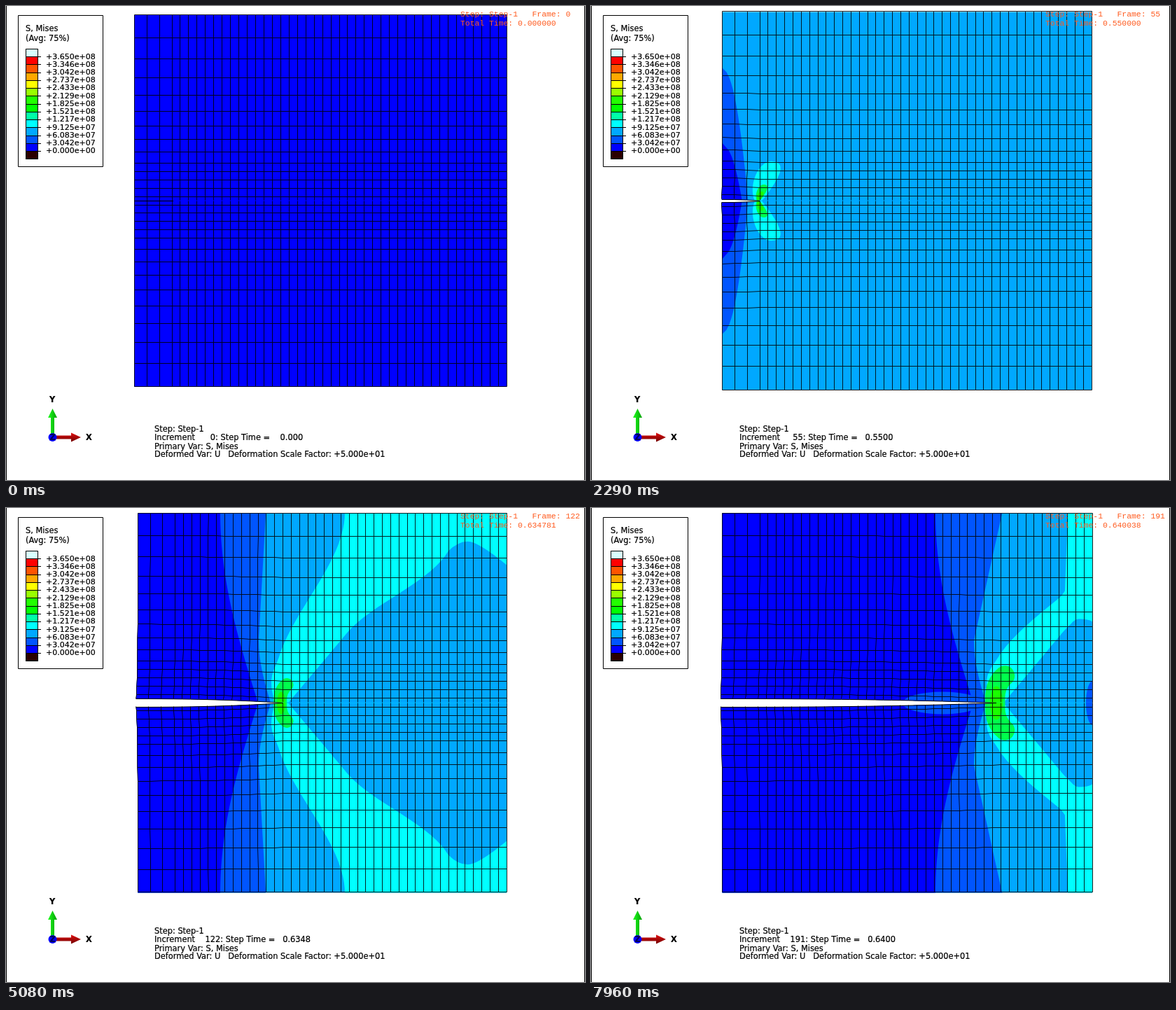
Animation, 827 px wide and 677 px high, one loop 8000 ms. Source, as an HTML page with a canvas:

```html
<!DOCTYPE html>
<html lang="en">
<head>
<meta charset="utf-8">
<title>Crack growth, von Mises stress</title>
<style>
  html, body { margin: 0; width: 100%; height: 100%; overflow: hidden; background: #fff; }
  canvas, svg { position: absolute; left: 0; top: 0; width: 827px; height: 677px; }
  text { white-space: pre; font: 11.4px "DejaVu Sans", sans-serif; stroke: #000; stroke-width: .2px; }
  .label { font-size: 11px; }
  .axis { font-weight: bold; }
  .status { font: 11.4px "Liberation Mono", monospace; fill: #ff5a1e; stroke: none; }
</style>
</head>
<body>
<canvas id="plot" width="827" height="677"></canvas>
<svg viewBox="0 0 827 677">
  <defs>
    <linearGradient id="red" x2="0" y2="1"><stop stop-color="#e01010"/><stop offset="1" stop-color="#700000"/></linearGradient>
    <linearGradient id="green"><stop stop-color="#20ff20"/><stop offset="1" stop-color="#00a000"/></linearGradient>
  </defs>
  <path d="M.5 0V677M826.5 0V677M17.5 13.5H138.5V229.5H17.5Z" fill="none" stroke="#000"/>
  <text x="28" y="36">S, Mises</text>
  <text x="28" y="50">(Avg: 75%)</text>
  <g id="legend"></g>
  <path d="M64 612V588H60L66.5 575L73 588H69V612Z" fill="url(#green)"/>
  <path d="M72 613.5H93V609.5L107 616L93 622.5V618.5H72Z" fill="url(#red)"/>
  <circle cx="66.5" cy="616" r="6" fill="#00f"/>
  <text x="62.5" y="620" class="axis" fill="#000060">Z</text>
  <text x="62" y="566" class="axis">Y</text>
  <text x="114" y="619.5" class="axis">X</text>
  <text x="212" y="607.5">Step: Step-1</text>
  <text x="212" y="620" id="increment"></text>
  <text x="212" y="632.5">Primary Var: S, Mises</text>
  <text x="212" y="644">Deformed Var: U   Deformation Scale Factor: +5.000e+01</text>
  <text x="649" y="15" class="status" id="frameText"></text>
  <text x="649" y="28" class="status" id="timeText"></text>
</svg>
<script>
const LOOP = 8000, FPS = 24, LAST = 191, GROWTH = 63;
const MID = 278, LEFT = 183, RIGHT = 715, HALF = 265.4, TOP = 272, NOTCH = 239;
const ctx = document.getElementById('plot').getContext('2d');
const byId = id => document.getElementById(id);

// Stress bands, lowest first
const BANDS = ['#0000ff', '#0055ff', '#00a8ff', '#00ffff', '#00ff4c', '#1aff00'];

// Crack growth: increment, tip position, total time
const STEPS = [
  [GROWTH, NOTCH, 0.63], [75, 289, 0.631993], [101, 345, 0.633654],
  [122, 393, 0.634781], [149, 469, 0.637125], [LAST, 579, 0.640038]];

// Mesh lines: columns in x, rows as distance from the crack plane
const COLS = [183, 201, 219, ...Array.from({ length: 41 }, (_, i) => 237 + i * 11.95)];
const ROWS = [6];
for (let i = 1; i < 14; i++) ROWS.push(ROWS[i - 1] + (i < 5 ? 11.9 : 16 * 1.094 ** (i - 5)));

const clamp = v => Math.max(0, Math.min(1, v));
const smooth = v => clamp(v) ** 2 * (3 - 2 * clamp(v));
const wave = v => Math.sin(Math.PI * clamp(v));
const range = (end, count) => Array.from({ length: count + 1 }, (_, i) => end * i / count);
const DIST = range(TOP, 34);

function stateAt(n) {
  if (n <= GROWTH) {
    const time = n / 100;
    return { n, time, tip: NOTCH, opening: 3.9 * time, stretch: 8.4 * time, shrink: 8.3 * time, drift: 0 };
  }
  const i = STEPS.findIndex(step => step[0] >= n);
  const a = STEPS[i - 1], b = STEPS[i], f = (n - a[0]) / (b[0] - a[0]);
  const late = clamp((n - 122) / 69);
  return {
    n, tip: a[1] + (b[1] - a[1]) * f, time: a[2] + (b[2] - a[2]) * f,
    opening: 6 - 3.5 * Math.exp((GROWTH - n) / 14),
    stretch: 5.5, shrink: 5.2 - 1.8 * late, drift: clamp(late * 2.6)
  };
}

function fillPath(color, points) {
  ctx.fillStyle = color;
  ctx.beginPath();
  points.forEach(p => ctx.lineTo(...p));
  ctx.fill();
}

function fillSide(color, contour, edge) {
  fillPath(color, [...DIST.map(d => [contour(d), d]), [edge, TOP], [edge, 0]]);
}

function fillEllipse(color, x, rx, ry) {
  ctx.fillStyle = color;
  ctx.beginPath();
  ctx.ellipse(x, 0, rx, ry, 0, 0, 7);
  ctx.fill();
}

function fillBase(color) {
  ctx.fillStyle = color;
  ctx.fillRect(150, -2, 600, 290);
}

// Leaf-shaped zone leaning forward from the tip
function fillLobe(color, scale) {
  ctx.save();
  ctx.translate(NOTCH, 0);
  ctx.scale(scale, scale);
  ctx.fillStyle = color;
  ctx.beginPath();
  ctx.moveTo(-6, 0);
  ctx.bezierCurveTo(-18, 28, 2, 70, 24, 67);
  ctx.bezierCurveTo(50, 65, 36, 38, 6, 0);
  ctx.fill();
  ctx.restore();
}

// Unloaded zone beside the notch; ratio = far stress / level
function shadow(ratio) {
  const height = 115 * Math.sqrt(0.78 / Math.max(ratio - 1, 0.01));
  const width = 33 * (height / 115) ** 0.3;
  return d => {
    const q = d / height;
    return 186 + width * (q < 1 ? (1 - q) ** 0.45 : 1 - q);
  };
}

function paintLoading(time) {
  const ratios = BANDS.map((_, k) => k ? time * 4.685 / k : 9);
  const base = ratios.filter(r => r >= 1).length - 1;
  fillBase(BANDS[base]);
  for (let k = base + 1; k < BANDS.length; k++) {
    const r = ratios[k];
    fillLobe(BANDS[k], Math.min(5, 0.6 * r * r / (1 - r) ** 0.33));
  }
  for (let k = base; k > 0; k--) fillSide(BANDS[k - 1], shadow(ratios[k]), 100);
}

// Contours travel with the tip and change as it nears the right edge
function paintGrowth(tip) {
  const early = Math.max(0, (345 - tip) / 56);
  const late = clamp((tip - 393) / 186);
  const cubic = d => (d / TOP) ** 3;

  const low = d => tip - 33 - 54 * wave(d / TOP / 2) - 53 * clamp(early) * cubic(d);
  const medium = d => tip - 15 - 17 * wave(Math.min(d, 90) / 180)
    + (10 + 30 * late) * Math.max(0, d - 90) / 180 - 60 * Math.max(0, early - 1) * cubic(d);
  const high = d => Math.min(671 + d / 27,
    tip - 9 - 5 * wave(d / 60) + (100 + 100 * late) * smooth((d - 30) / 242));
  const front = d => tip + 10 + 0.84 * d + 48 * wave((d - 100) / 210) ** 2;

  const peak = 90 + 210 * Math.exp((345 - tip) / 120);
  const peakX = 650 + (tip - 345) / 5;
  const drop = 60 * Math.exp((345 - tip) / 90);

  fillBase(BANDS[2]);
  fillSide(BANDS[3], high, 900);

  // Calmer zone ahead of the tip, with a rounded crest
  const rise = range(0.94 * peak, 30).map(d => [front(d), d]);
  const crest = rise[30];
  ctx.fillStyle = BANDS[2];
  ctx.beginPath();
  rise.forEach(p => ctx.lineTo(...p));
  ctx.quadraticCurveTo((crest[0] + peakX) / 2, peak, peakX, peak);
  ctx.quadraticCurveTo(peakX + 15, peak, 717, peak - drop);
  ctx.lineTo(717, 0);
  ctx.fill();

  fillSide(BANDS[1], medium, 100);
  fillSide(BANDS[0], low, 100);

  const wake = clamp((tip - 430) / 149);
  const reach = 20 + 37 * wake;
  fillEllipse(BANDS[1], tip - 20 - reach, reach, 16 * Math.sqrt(wake));
  const edge = clamp((tip - 541) / 38);
  fillEllipse(BANDS[1], 717, 10 * edge, 32 * edge);

  // Plastic zone: a thick curved stroke with a hotter core
  const size = 1 + late / 2;
  ctx.save();
  ctx.translate(tip, 0);
  ctx.scale(size, size);
  ctx.strokeStyle = BANDS[4];
  ctx.lineWidth = 19;
  ctx.lineCap = 'round';
  ctx.beginPath();
  ctx.moveTo(-1, -2);
  ctx.quadraticCurveTo(-3, 17, 8, 26);
  ctx.stroke();
  fillEllipse(BANDS[5], 0, 6, 16);
  ctx.restore();
}

function line(points, side) {
  ctx.beginPath();
  points.forEach(([x, y]) => ctx.lineTo(Math.floor(x) + 0.5, Math.floor(MID + side * y) + 0.5));
  ctx.stroke();
}

function drawPlot({ n, time, tip, opening, stretch, shrink, drift }) {
  const place = (x, d) => {
    const open = x < tip ? opening * (1 - ((x - LEFT) / (tip - LEFT)) ** 2.4) : 0;
    const f = d / HALF;
    return [
      RIGHT + drift - (RIGHT - x) * (1 - shrink / (RIGHT - LEFT)) - open * 0.4 * Math.exp(-d / 40),
      d + open * (1 - f) + stretch * f];
  };
  const levels = [0, ...ROWS];
  const face = [...COLS.filter(x => x < tip).map(x => place(x, 0)), [tip, 0]];
  const outline = [
    ...face, [tip, -1], [RIGHT + drift, -1],
    ...COLS.map(x => place(x, HALF)).reverse(),
    ...levels.map(d => place(LEFT, d)).reverse()];

  ctx.clearRect(0, 0, 827, 677);
  ctx.strokeStyle = '#000';
  for (const side of [-1, 1]) {
    ctx.save();
    ctx.translate(0, MID + 0.5);
    ctx.scale(1, side);
    ctx.beginPath();
    outline.forEach(p => ctx.lineTo(...p));
    ctx.clip();
    if (n <= GROWTH) paintLoading(time); else paintGrowth(tip);
    ctx.restore();

    ctx.globalAlpha = 0.85;
    COLS.forEach(x => line(levels.map(d => place(x, d)), side));
    ROWS.forEach(d => line(COLS.map(x => place(x, d)), side));
    ctx.globalAlpha = 1;
    ctx.beginPath();
    face.forEach(([x, y]) => ctx.lineTo(x, MID + 0.5 + side * y));
    ctx.stroke();
  }
}

function buildLegend() {
  const colors = ['#d8ffff', '#ff0000', '#ff5400', '#ffa800', '#ffff00', '#99ff00', '#22ff00',
    '#00ff00', '#00ffa8', '#00ffff', '#00a8ff', '#0055ff', '#0000ff', '#2a0000'];
  const edge = i => Math.round(61 + i * 11.23) + 0.5;
  byId('legend').innerHTML = colors.map((color, i) => {
    const y = edge(i), next = edge(i + 1);
    const box = `<rect x="28.5" y="${y}" width="17" height="${next - y}" fill="${color}" stroke="#000"/>`;
    if (i > 12) return box;
    const value = (3.6499e8 * (12 - i) / 12).toExponential(3).replace('e+', 'e+0');
    return box + `<path d="M45 ${next}H50" stroke="#000"/>` +
      `<text class="label" x="57" y="${75.5 + i * 11.23}">+${value}</text>`;
  }).join('').replace('0.000e+00', '0.000e+00');
}

let shown = -1;
function draw(now) {
  const n = Math.min(LAST, Math.floor((now % LOOP + 5) * FPS / 1000));
  if (n === shown) return;
  shown = n;
  const state = stateAt(n);
  drawPlot(state);
  const pad = ' '.repeat(7 - String(n).length);
  const stepTime = n ? state.time.toFixed(4) : ' 0.000';
  byId('increment').textContent = `Increment${pad}${n}: Step Time =   ${stepTime}`;
  byId('frameText').textContent = `Step: Step-1   Frame: ${n}`;
  byId('timeText').textContent = `Total Time: ${state.time.toFixed(6)}`;
}

buildLegend();
const start = performance.now();
function tick() {
  draw(performance.now() - start);
  requestAnimationFrame(tick);
}
tick();
</script>
</body>
</html>
```
